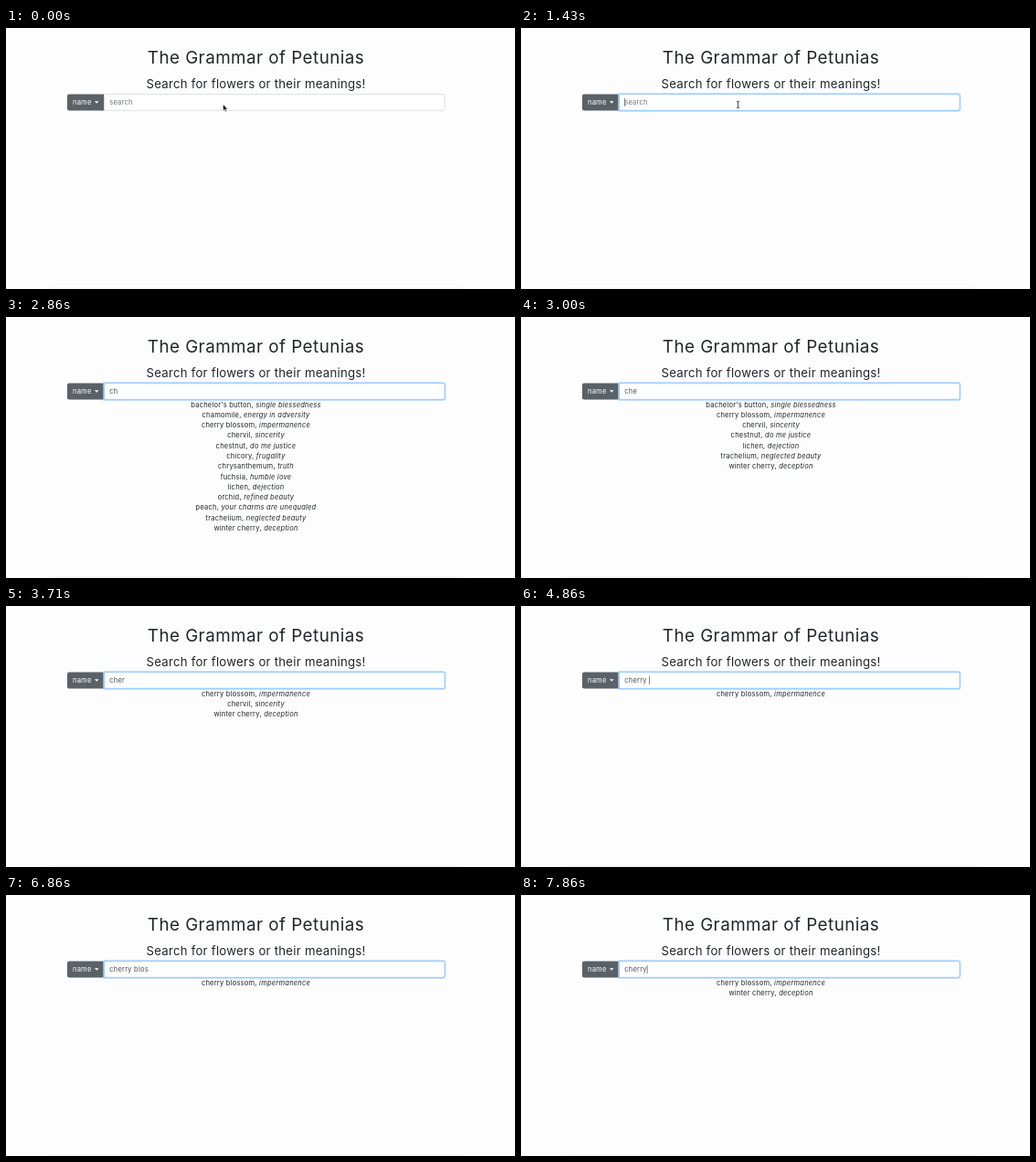
Recreate the animation shown at these times as an HTML page. Size 557x286 px, loop 8000 ms.

```html
<!DOCTYPE html>
<html lang="en">
<head>
<meta charset="utf-8">
<title>Flower search</title>
<style>
  html, body { margin: 0; width: 100%; height: 100%; overflow: hidden; background: #fdfdfd; }
  svg { display: block; width: 557px; height: 286px; }
  text { font-family: Inter, "Open Sans", sans-serif; font-size: 7.52px; font-optical-sizing: none;
         letter-spacing: .03em; fill: #212529; white-space: pre; }
  .middle { text-anchor: middle; }
  .title { font-size: 18.8px; letter-spacing: .025em; }
  .subtitle { font-size: 13.16px; letter-spacing: .02em; }
  .meaning { font-style: italic; }
</style>
</head>
<body>
<svg viewBox="0 0 557 286">
  <defs>
    <linearGradient id="fade">
      <stop offset="0" stop-color="#f6f6f6" stop-opacity="0"/>
      <stop offset=".03" stop-color="#f6f6f6"/>
      <stop offset=".97" stop-color="#f6f6f6"/>
      <stop offset="1" stop-color="#f6f6f6" stop-opacity="0"/>
    </linearGradient>
  </defs>
  <rect width="557" height="286" fill="#fdfdfd"/>
  <rect x="40" y="284" width="466" height="2" fill="url(#fade)"/>
  <text class="middle title" x="273.5" y="39.4">The Grammar of Petunias</text>
  <text class="middle subtitle" x="273.5" y="66">Search for flowers or their meanings!</text>

  <path d="M107.3 72.4H69a2 2 0 0 0-2 2v14a2 2 0 0 0 2 2h38.3z" fill="#5a6268"/>
  <text x="73" y="84" style="fill:#fff">name</text>
  <path d="M96.9 80.2h4.7l-2.35 2.5z" fill="#fff"/>
  <path id="glow" d="M107.2 72.1H478a2.4 2.4 0 0 1 2.4 2.4v14a2.4 2.4 0 0 1-2.4 2.4H107.2z"
        fill="none" stroke="#b5d9ff" stroke-width="1.7" stroke-linejoin="round"/>
  <path id="field" d="M107.6 72.6H478a2 2 0 0 1 2 2V88.3a2 2 0 0 1-2 2H107.6z" fill="#fff" stroke-width=".7"/>
  <text id="query" x="113.2" y="84"></text>
  <rect id="caret" y="77" width=".7" height="9" fill="#495057"/>
  <g id="results"></g>

  <path id="arrow" d="M237.6 83.8v7l1.6-1.5 1.1 2.5 1.1-.5-1.1-2.4h2.2z"
        fill="#000" stroke="#fff" stroke-width=".5"/>
  <path id="beam" d="M236 80.2q1.5 0 1.5.9 0-.9 1.5-.9M237.5 81v6M236 87.8q1.5 0 1.5-.9 0 .9 1.5.9"
        fill="none" stroke="#222" stroke-width=".8"/>
</svg>
<script>
const LOOP = 8000;
const HOVER = 290, FOCUS = 1290, TYPING = 2430;
const $ = id => document.getElementById(id);

const flowers = [
  "acacia, secret love", "acanthus, artifice", "angelica, inspiration",
  "bachelor's button, single blessedness", "buttercup, ingratitude", "cabbage, profit",
  "cactus, ardent love", "calendula, grief", "camellia, my destiny is in your hands",
  "candytuft, indifference", "canterbury bells, constancy", "carnation, fascination",
  "celandine, joys to come", "chamomile, energy in adversity", "cherry blossom, impermanence",
  "chervil, sincerity", "chestnut, do me justice", "chicory, frugality",
  "chrysanthemum, truth", "fuchsia, humble love", "lichen, dejection",
  "orchid, refined beauty", "peach, your charms are unequaled",
  "trachelium, neglected beauty", "winter cherry, deception"
].map(entry => entry.split(", "));

// [time, text in the field, text the results belong to]
const edits = [
  [0, ""], [2430, "c", ""], [2710, "ch", "c"], [2860, "ch"], [3000, "che"],
  [3570, "cher"], [3860, "cherr"], [4140, "cherry"], [4710, "cherry "]
];
const word = "blossom";
for (let i = 1; i <= word.length; i++)
  edits.push([5570 + Math.floor((i - 1) * 143.5), "cherry " + word.slice(0, i)]);
[6570, 6710, 6860, 7000, 7140, 7430, 7570].forEach((time, i) =>
  edits.push([time, "cherry " + word.slice(0, 6 - i)]));
edits.push([7860, "cherry"]);

const caretSpans = [[1290, 1790], [2290, 2430], [4710, 5140], [7860, LOOP]];

const show = (id, on) => $(id).setAttribute("visibility", on ? "visible" : "hidden");
const between = (t, [start, end]) => t >= start && t < end;

function renderResults(filter) {
  const found = filter ? flowers.filter(([name]) => name.includes(filter)) : [];
  $("results").innerHTML = found.slice(0, 17).map(([name, meaning], i) =>
    `<text class="middle" x="273.5" y="${98.6 + i * 11.28}">${name}, <tspan class="meaning">${meaning}</tspan></text>`
  ).join("");
}

let shownFilter;
function render(t) {
  const [, text, filter = text] = edits.filter(([time]) => time <= t).pop();
  const focused = t >= FOCUS;
  $("query").textContent = text || "search";
  $("query").style.fill = text ? "#495057" : "#6c757d";
  $("field").setAttribute("stroke", focused ? "#80bdff" : "#ced4da");
  $("caret").setAttribute("x", 113.2 + (text ? $("query").getComputedTextLength() : 0));
  show("caret", caretSpans.some(span => between(t, span)));
  show("glow", focused);
  show("arrow", t < HOVER);
  show("beam", between(t, [HOVER, TYPING]));
  if (filter !== shownFilter) renderResults(shownFilter = filter);
}

const start = performance.now();
function tick() {
  render((performance.now() - start) % LOOP);
  requestAnimationFrame(tick);
}
tick();
</script>
</body>
</html>
```
